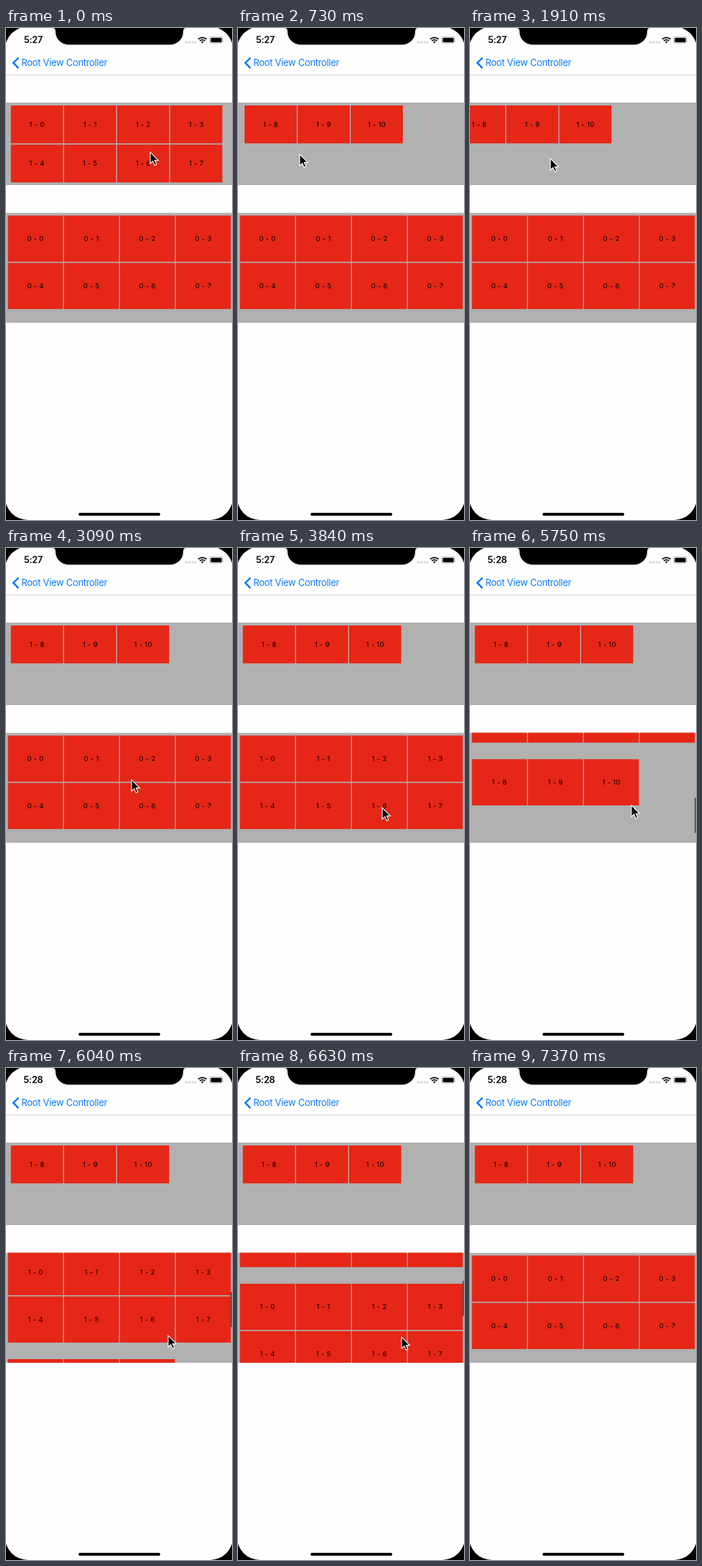
Animation, 315 px wide and 686 px high, one loop 7.47 s. Source, as an HTML page:

```html
<!DOCTYPE html>
<html lang="en">
<head>
<meta charset="utf-8">
<title>Paged grids</title>
<style>
html, body { margin: 0; width: 100%; height: 100%; overflow: hidden; background: #000; }
svg { display: block; }
text { font-family: Inter, "Liberation Sans", sans-serif; }
.cell { fill: #e62617; }
.label { font-size: 9.5px; letter-spacing: .3px; text-anchor: middle; }
</style>
</head>
<body>
<svg width="100%" height="100%" viewBox="0 0 315 686">
  <rect x="-1.3" y="-2" width="317.6" height="688" rx="32" fill="#fefefe"/>
  <path d="M65 0q4 0 4 5a18 18 0 0 0 18 18.2h142a18 18 0 0 0 18-18.2q0-5 4-5z"/>

  <rect y="65" width="315" height="1" fill="#d2d2d4"/>
  <path d="M17.3 41.5L10.3 48.7L17.3 55.9" fill="none" stroke="#0a7aff" stroke-width="2.5"/>
  <text x="21.5" y="53.3" font-size="13" letter-spacing="-.32" fill="#0a7aff">Root View Controller</text>

  <svg y="104" width="315" height="115">
    <rect width="315" height="115" fill="#b1b1b1"/>
    <g id="across"></g>
  </svg>
  <svg y="257.5" width="315" height="153.5">
    <rect width="315" height="153.5" fill="#b1b1b1"/>
    <g id="down"></g>
    <rect id="bar" x="312.8" width="2.2" height="49.5" rx="1.1"/>
  </svg>

  <text id="clock" x="38" y="21.3" font-size="12.6" font-weight="600" letter-spacing="-.2" text-anchor="middle"></text>
  <path d="M251.3 20h13" stroke="#bdbdbf" stroke-width="2.6" stroke-linecap="round" stroke-dasharray="0 4.2"/>
  <g fill="none" stroke="#000" stroke-width="1.7">
    <path d="M268 15.7a8.2 8.2 0 0 1 11.6 0M270.2 18a5.1 5.1 0 0 1 7.2 0"/>
    <path d="M271.9 19.2L273.8 21.3L275.7 19.2Q273.8 17.8 271.9 19.2Z" fill="#000" stroke="none"/>
  </g>
  <rect x="284" y="12.5" width="18" height="8.8" rx="2.4" fill="none" stroke="#a5a5a5" stroke-width=".9"/>
  <rect x="285.3" y="13.8" width="15.4" height="6.2" rx="1.3"/>
  <path d="M303.1 15.4q1.5 1.5 0 3z" fill="#a5a5a5"/>
  <rect x="101" y="676" width="114" height="4" rx="2"/>

  <path id="cursor" d="M0 0V16l3.7-3.4 2.5 5.7 2.6-1.1-2.5-5.6h5z" stroke="#fff" stroke-width="1.1"/>
</svg>
<script>
const LOOP = 7470, TICK = 147.4, LAST = 50, WIDTH = 315, PAGE = 153.5;
const $ = id => document.getElementById(id);
const clamp = v => Math.max(0, Math.min(1, v));
const smooth = p => p * p * (3 - 2 * p);
const glide = p => p < .5 ? 4 * p ** 3 : 1 - 4 * (1 - p) ** 3;

// One page of up to eight cells in rows of four.
function page(section, first, count, x, y, w, h, dx, dy) {
  let out = "";
  for (let i = 0; i < count; i++) {
    const cx = x + i % 4 * dx, cy = y + (i >> 2) * dy;
    out += `<rect class="cell" x="${cx}" y="${cy}" width="${w}" height="${h}"/>
      <text class="label" x="${cx + w / 2}" y="${cy + h / 2 + 3.5}">${section} - ${first + i}</text>`;
  }
  return out;
}
const small = (first, count, n) =>
  page(1, first, count, 6.8 + n * WIDTH, 4, 72.7, 52.8, 74, 54.5);
const large = (section, first, count, n) =>
  page(section, first, count, 2.7, 4 + n * PAGE, 76.7, 64.4, 78, 66);

$("across").innerHTML = small(0, 8, 0) + small(8, 3, 1);
$("down").innerHTML = large(0, 0, 8, 0) + large(1, 0, 8, 1) + large(1, 8, 3, 2);

// Vertical swipes, one page each; times are in ticks.
const swipes = [
  { start: 21, span: 3, dir: 1 },
  { start: 27, span: 6.8, dir: 1 },
  { start: 37, span: 5.3, dir: -1 },
  { start: 43, span: 5, dir: -1 },
];
const progress = (t, start, span) => clamp((t - start) / span);

// Horizontal: one page turn, then a pull past the end that springs back.
const acrossAt = t =>
  WIDTH * glide(progress(t, 0, 5.7)) + 35 * Math.sin(Math.PI * progress(t, 9, 6));
const downAt = t =>
  swipes.reduce((y, s) => y + s.dir * PAGE * glide(progress(t, s.start, s.span)), 0);
// The scroll bar appears with a swipe and fades over two ticks after it.
const barAt = t =>
  Math.max(...swipes.map(s => clamp(Math.min(t - s.start, (s.start + s.span + 2 - t) / 2))));

// Turning points of the pointer: tick, x, y.
const turns = [[0, 201, 173], [5, 86, 176], [9, 196, 180], [13, 112, 182], [16, 128, 203],
  [21, 175, 323], [23, 186, 250], [26, 201, 362], [30, 212, 250], [33, 219, 281],
  [41, 226, 373], [43, 224, 275], [45, 228, 375], [48, 240, 740]];

function pointerAt(t) {
  const i = Math.max(1, turns.findIndex(k => k[0] >= t));
  const [a, ax, ay] = turns[i - 1], [b, bx, by] = turns[i];
  const p = smooth((t - a) / (b - a));
  return [ax + (bx - ax) * p, ay + (by - ay) * p];
}

function draw(now) {
  // The picture advances in held steps.
  const t = Math.min(LAST, Math.floor((now % LOOP + 8) / TICK));
  const y = downAt(t);
  $("across").setAttribute("transform", `translate(${-acrossAt(t)})`);
  $("down").setAttribute("transform", `translate(0 ${-y})`);
  $("bar").setAttribute("y", 2.2 + y / (2 * PAGE) * 99);
  $("bar").setAttribute("opacity", barAt(t) * 0.45);
  $("cursor").setAttribute("transform", `translate(${pointerAt(Math.min(t, 48))})`);
  $("clock").textContent = t < 37 ? "5:27" : "5:28";
}

const start = performance.now();
function loop() {
  draw(performance.now() - start);
  requestAnimationFrame(loop);
}
loop();
</script>
</body>
</html>
```
